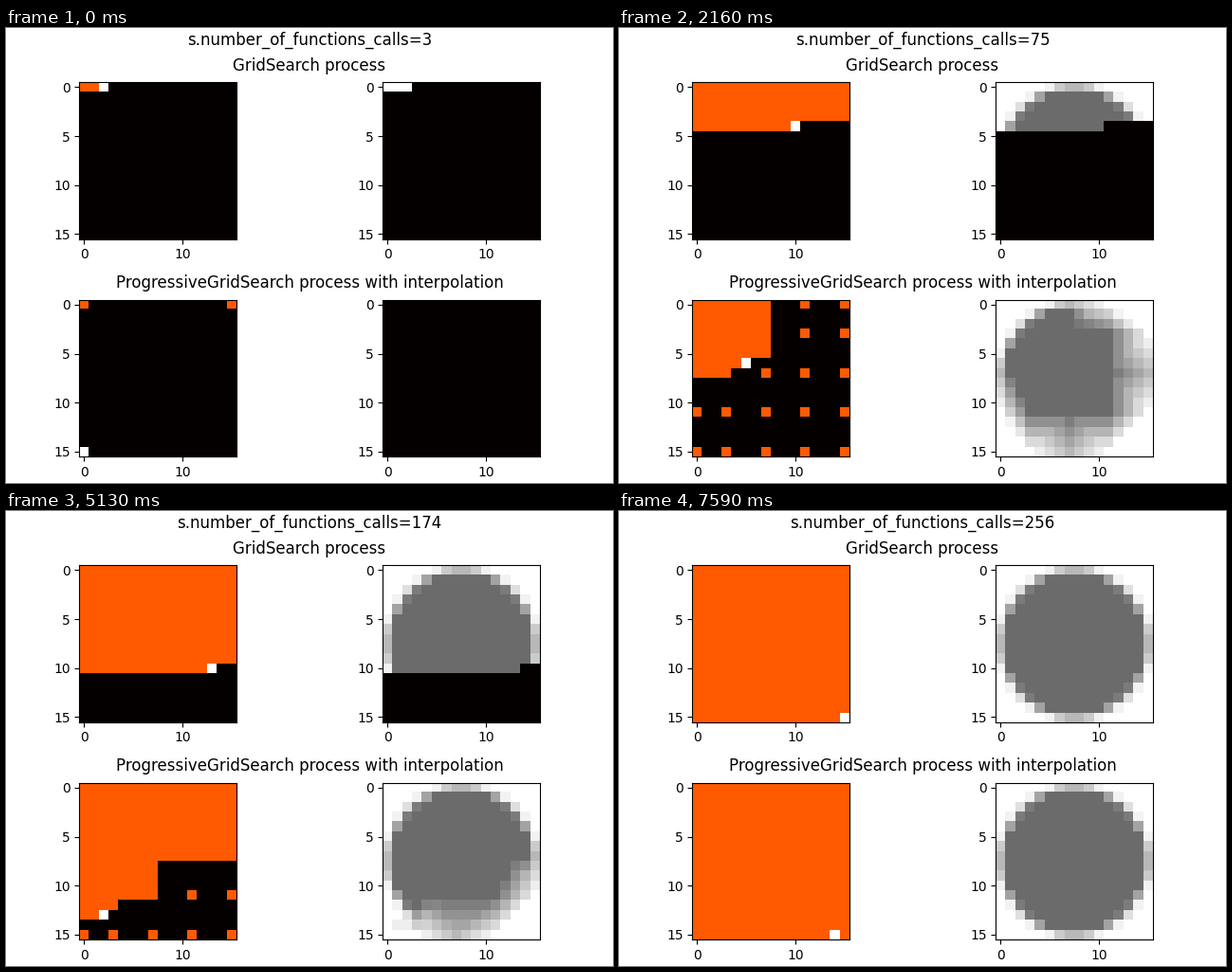
Recreate the animation shown at these times as a matplotlib script. Size 640 by 480 pixels, loop 7620 ms.

```python
import numpy as np
import matplotlib.pyplot as plt
from matplotlib.animation import FuncAnimation
from matplotlib.colors import ListedColormap
from matplotlib.tri import Triangulation, LinearTriInterpolator

W, H, DPI = 640, 480, 100
SIZE = 16
FIRST, LAST = 3, SIZE * SIZE
SIDE = 165.4
BLACK = "#050000"

plt.rcParams["font.family"] = "DejaVu Sans"


def split(cell):
    """Quarter a cell at its integer midpoints, row by row."""
    x0, x1, y0, y1 = cell
    xm, ym = (x0 + x1) // 2, (y0 + y1) // 2
    return [(a, b, c, d)
            for c, d in ((y0, ym), (ym, y1))
            for a, b in ((x0, xm), (xm, x1))]


def progressive_order():
    """Corners of ever finer cells, then every point left in the finest ones."""
    seen = {}
    cells = [(0, SIZE - 1, 0, SIZE - 1)]
    for _ in range(3):
        for x0, x1, y0, y1 in cells:
            for p in ((x0, y0), (x1, y0), (x0, y1), (x1, y1)):
                seen.setdefault(p)
        cells = [child for cell in cells for child in split(cell)]
    for x0, x1, y0, y1 in cells:
        for y in range(y0, y1 + 1):
            for x in range(x0, x1 + 1):
                seen.setdefault((x, y))
    return np.array(list(seen))


gx, gy = np.meshgrid(np.arange(SIZE), np.arange(SIZE))
raster = np.column_stack([gx.ravel(), gy.ravel()])
progressive = progressive_order()

# The sampled function: a grey disc on white.
cover = np.clip(8 - np.hypot(gx - 7.5, gy - 7.5), 0, 1)
shape = 255 - 147 * cover


def visited(order, n):
    grid = np.zeros((SIZE, SIZE))
    x, y = order[:n].T
    grid[y, x] = 1
    grid[y[-1], x[-1]] = 2
    return grid


def revealed(order, n):
    grid = np.zeros((SIZE, SIZE))
    x, y = order[:n].T
    grid[y, x] = shape[y, x]
    return grid


def interpolated(order, n):
    if n < 4:
        return np.zeros((SIZE, SIZE))
    x, y = order[:n].T
    values = shape[y, x]
    surface = LinearTriInterpolator(Triangulation(x, y), values)
    grid = np.ma.filled(surface(gx, gy), 255)
    grid[y, x] = values
    return grid


fig = plt.figure(figsize=(W / DPI, H / DPI), dpi=DPI, facecolor="white")
path_colors = ListedColormap([BLACK, "#ff5a00", "white"])
view_colors = plt.get_cmap("gray").with_extremes(under=BLACK)


def panel(center, top, cmap, vmin, vmax):
    left = center - SIDE / 2
    ax = fig.add_axes([left / W, 1 - (top + SIDE) / H, SIDE / W, SIDE / H])
    image = ax.imshow(np.zeros((SIZE, SIZE)), cmap=cmap, vmin=vmin, vmax=vmax,
                      interpolation="nearest", aspect="auto")
    ax.set_xticks([0, 10])
    ax.set_yticks([0, 5, 10, 15])
    return image


def row(top, baseline, title):
    fig.text(0.5, 1 - baseline / H, title, fontsize=12,
             ha="center", va="baseline")
    return (panel(W / 4, top, path_colors, 0, 2),
            panel(3 * W / 4, top, view_colors, 1, 255))


grid_path, grid_view = row(57.2, 45, "GridSearch process")
prog_path, prog_view = row(
    286.7, 274, "ProgressiveGridSearch process with interpolation")
counter = fig.text(0.5, 1 - 4.17 / H, "", fontsize=12, ha="center", va="top")


def update(i):
    n = FIRST + i
    counter.set_text(f"s.number_of_functions_calls={n}")
    grid_path.set_data(visited(raster, n))
    grid_view.set_data(revealed(raster, n))
    prog_path.set_data(visited(progressive, n))
    prog_view.set_data(interpolated(progressive, n))
    return counter, grid_path, grid_view, prog_path, prog_view


anim = FuncAnimation(fig, update, frames=LAST - FIRST + 1, interval=30,
                     repeat=True, repeat_delay=0, blit=False)
plt.show()
```
